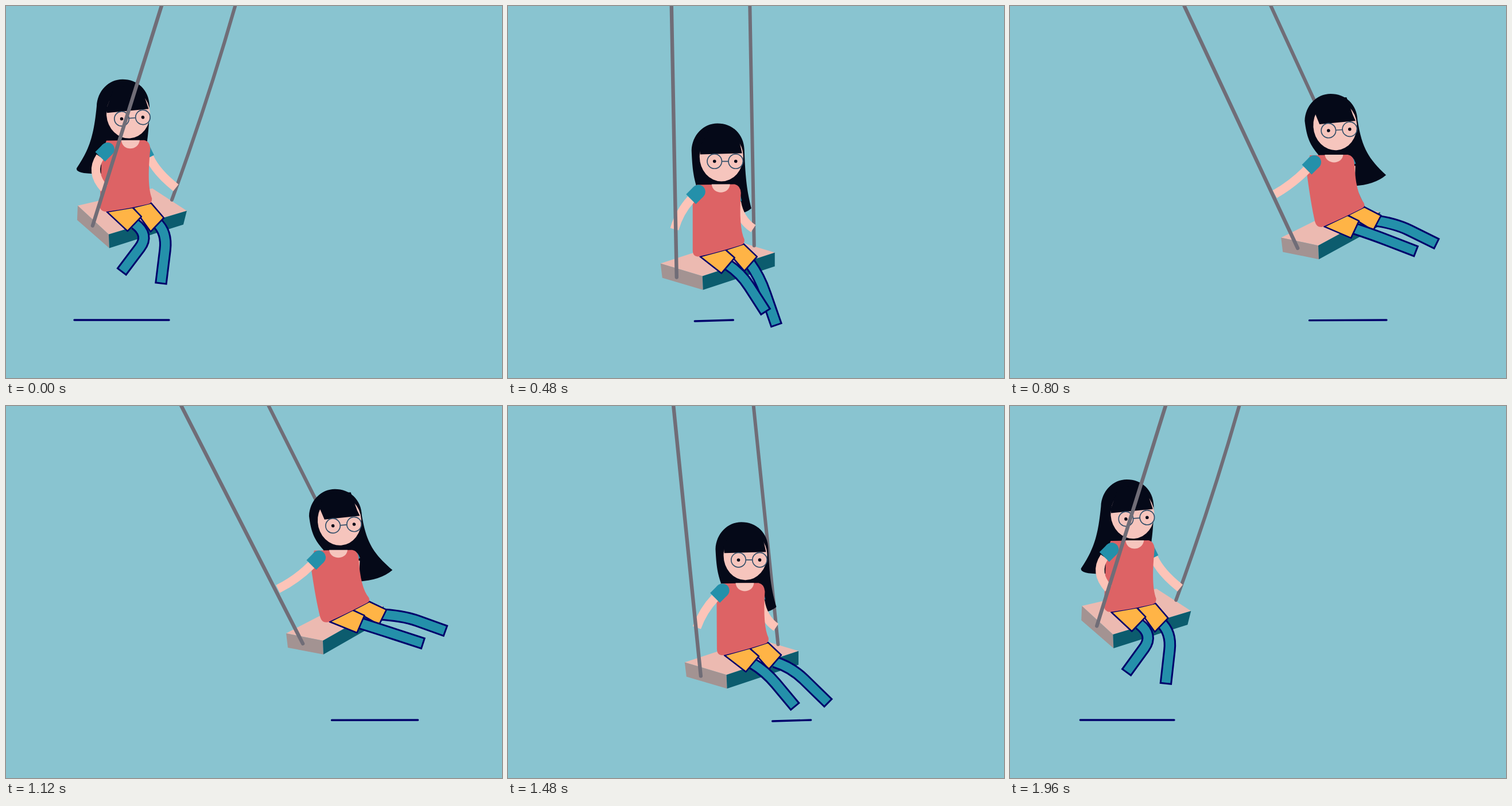
These frames come from a looping animation (864x648 px, 2 s). An HTML page:

```html
<!DOCTYPE html>
<html lang="en">
<head>
<meta charset="utf-8">
<title>Girl on a swing</title>
<style>
  html, body { margin: 0; width: 100%; height: 100%; overflow: hidden; background: #89c4d0; }
  svg { display: block; width: 100vw; height: 100vh; }
</style>
</head>
<body>
<svg id="stage" viewBox="0 0 864 648"></svg>
<script>
const LOOP = 2000, STEP = 40;
const NAVY = '#00006b', TEAL = '#2490aa', HAIR = '#050918', SKIN = '#fdc4b8',
      FACE = '#f6c5bd', YELLOW = '#ffb446', ROPE = '#706d77', FRAME = '#34506a';

// Clothes of the hanging pose, measured from the top of the head.
const SHIRT = 'M-36 107L30 106Q40 108 41 121Q37 181 47 202Q48 210 41 212Q-4 226 -33 232Q-43 232 -43 221Q-43 190 -43 131Z';
const NECK = 'M-10 106C-8 125 20 125 22 106Z';
const NEAR_SHORTS = 'M-30 232L7 261L30 234L14 220Z';
const FAR_SHORTS = 'M15 220L47 257L69 232L46 210Z';

const stage = document.getElementById('stage');

function set(el, attrs) {
  for (const name in attrs) el.setAttribute(name, attrs[name]);
}
function add(parent, tag, attrs = {}) {
  const el = document.createElementNS('http://www.w3.org/2000/svg', tag);
  set(el, attrs);
  parent.append(el);
  return el;
}
const filled = (parent, fill, extra) => add(parent, 'path', { fill, ...extra });
const stroked = (parent, stroke, width, cap = 'butt') =>
  add(parent, 'path', { fill: 'none', stroke, 'stroke-width': width, 'stroke-linecap': cap, 'stroke-linejoin': 'round' });

const shadow = stroked(stage, NAVY, 3.4, 'round');
const bench = add(stage, 'g');
const seatTop = filled(bench, '#ecbab1');
const seatSide = filled(bench, '#a39392');
const seatFront = filled(bench, '#0c5c6e');
const farRope = stroked(stage, ROPE, 6, 'round');
const girl = add(stage, 'g');
const hair = filled(girl, HAIR);

const makeArm = width => ({
  skin: stroked(girl, SKIN, 15),
  sleeve: stroked(girl, TEAL, width),
  cap: add(girl, 'circle', { r: width / 2, fill: TEAL })
});
const makeLeg = () => ({ edge: stroked(girl, NAVY, 21.5), fill: stroked(girl, TEAL, 15.5) });
const makeShorts = () => filled(girl, YELLOW, { stroke: NAVY, 'stroke-width': 2.6, 'stroke-linejoin': 'round' });

const farArm = makeArm(18);
const farLeg = makeLeg(), farShorts = makeShorts();
const nearLeg = makeLeg(), nearShorts = makeShorts();
const shirt = filled(girl, '#dd6365');
const neck = filled(girl, FACE);
const nearArm = makeArm(24);
const head = add(girl, 'g');
add(head, 'ellipse', { cx: 7, cy: 58, rx: 38, ry: 43, fill: FACE });
const fringe = filled(head, HAIR);
for (const cx of [-5, 32]) {
  add(head, 'circle', { cx, cy: 66, r: 12.7, fill: 'none', stroke: FRAME, 'stroke-width': 1.7 });
  add(head, 'circle', { cx, cy: 66, r: 2.8, fill: HAIR });
}
set(stroked(head, FRAME, 1.7), { d: 'M7.7 66H19.3' });
const nearRope = stroked(stage, ROPE, 6.4, 'round');

// Ease with horizontal handles at x = a and x = c.
function ease(x, a, c) {
  let lo = 0, hi = 1;
  for (let i = 0; i < 24; i++) {
    const s = (lo + hi) / 2, q = 1 - s;
    if (3 * a * s * q * q + 3 * c * s * s * q + s * s * s < x) lo = s; else hi = s;
  }
  return lo * lo * (3 - 2 * lo);
}

const plus = ([x, y], [dx, dy], k = 1) => [x + dx * k, y + dy * k];
const mix = (p, q, kx, ky) => [p[0] + (q[0] - p[0]) * kx, p[1] + (q[1] - p[1]) * ky];
const polygon = points => ({ d: 'M' + points.join(' ') + 'Z' });

function drawArm(arm, shoulder, cuff, elbow, hand) {
  set(arm.skin, { d: `M${cuff}Q${elbow} ${hand}` });
  set(arm.sleeve, { d: `M${shoulder}L${cuff}` });
  set(arm.cap, { cx: shoulder[0], cy: shoulder[1] });
}

function drawLeg(leg, hip, knee, degrees, length) {
  const a = degrees * Math.PI / 180, down = [Math.sin(a), Math.cos(a)];
  const shank = end => `M${hip}Q${knee} ${plus(knee, down, length * .35)}L${plus(knee, down, end)}`;
  set(leg.edge, { d: shank(length + 1.5) });
  set(leg.fill, { d: shank(length - 1.5) });
}

function drawHair(left, right, r) {
  const crownL = [-45, 47], crownR = [47, 46];
  const flow = (from, tip) => [mix(from, tip, .15, .5), mix(from, tip, .38, .7)];
  const [r1, r2] = flow(crownR, right), [l1, l2] = flow(crownL, left);
  const hem = right[1] + 9 + 11 * r;
  set(hair, { d: `M0 0C26 0 46 18 ${crownR}C${r1} ${r2} ${right}Q${right[0] - 8 - 13 * r} ${hem - 2} 40 ${hem}` +
    `L-15 ${left[1] + 8}Q${left[0] - 2} ${left[1] + 13} ${left}C${l2} ${l1} ${crownL}C-44 20 -24 0 0 0Z` });
}

function drawShadow(p, forward) {
  const e = ease(p, .5, .7), mid = 201.5 + 450 * (forward ? e : 1 - e);
  const spread = Math.sin(Math.PI / 2 * (p < .47 ? (.47 - p) / .47 : (p - .47) / .53)) ** 2;
  const half = (67 + 98 * spread) / 2;
  set(shadow, { d: `M${mid - half} ${549 - 2 * spread}L${mid + half} 547` });
}

function draw(time) {
  const t = Math.floor(time % LOOP / STEP) * STEP;
  const forward = t < LOOP / 2, p = t % (LOOP / 2) / (LOOP / 2);
  const u = forward ? ease(p, .59, .465) : 1 - ease(p, .59, .37);

  // How far the figure bends away from hanging, to the left and to the right.
  const l = Math.max(0, .43 - u) / .43, l2 = l * l, l3 = l2 * l;
  const r = Math.max(0, u - .5) / .48;
  const tuck = (1 - u) ** 15;
  const bend = (rest, toLeft, toRight, k = l) => plus(plus(rest, toLeft, k), toRight, r);

  const angle = (17.4 - 45.2 * u) * Math.PI / 180, length = 515 - 70 * l ** 1.75 - 3 * r;
  const end = plus([284, -42], [-Math.sin(angle), Math.cos(angle)], length);
  const top = plus(end, [71 - 19 * l2 - 15 * r, -268 + 13 * l3 - r]);
  const move = { transform: `translate(${top})` };
  set(bench, move);
  set(girl, move);

  set(nearRope, { d: `M284 -42L${end}` });
  const farEnd = plus(top, bend([64, 213], [22, -3], [-1, -3], l2));
  const sag = plus(mix([420, -75], farEnd, .5, .5), [10 * l2, 0]);
  set(farRope, { d: `M420 -75Q${sag} ${farEnd}` });

  const left = bend([-99, 244], [21, -24], [14, 7], l3);
  const back = bend([27, 203], [25, -13], [-5, -7], l3);
  const right = bend([100, 225], [12, 4], [-15, -21], l3);
  const front = bend([-26, 266], [2, 4], [5, -2], l3);
  const under = corner => plus(corner, [1, 24]);
  set(seatTop, polygon([left, back, right, front]));
  set(seatSide, polygon([left, front, under(front), plus(left, [3 - 4 * l3, 25])]));
  set(seatFront, polygon([front, right, plus(right, [-6 * l3, 24]), under(front)]));

  // Clothes lean with the swing, more the lower they are.
  const lean = path => ({ d: path.replace(/(-?\d+) (-?\d+)/g, (_, a, b) => {
    const x = +a, drop = b - 106, w = drop / 120;
    return [x + .0013 * r * drop * drop + l2 * (8 - .04 * drop),
            +b + w * ((.1 * l2 - .2 * r) * x + 2 * l2 - 7 * r)].join(' ');
  }) });
  set(shirt, lean(SHIRT));
  set(neck, lean(NECK));
  set(nearShorts, lean(NEAR_SHORTS));
  set(farShorts, lean(FAR_SHORTS));

  drawHair([-36 - 44 * l2 + 16 * r, 106 + 49 * Math.min(1, 2 * l)],
           [60 - 17 * l + 40 * r, 148 - 40 * l2 - 7 * r], r);
  set(head, { transform: `translate(${3 * l2 + r} ${2 * l2 - 3 * r}) rotate(${-4 * (l2 + r)} 7 58)` });
  set(fringe, { d: `M${-31 + 4 * r} ${42 - 11 * r + 6 * l}L${-30 + 11 * r} 54L43 52` +
    `L${39 - 2 * l2} ${34 + 8 * r - 5 * l2}L30 10L-14 10Z` });

  const shoulder = bend([-33, 119], [7, 3], [5, 0], l2);
  drawArm(nearArm, shoulder, plus(shoulder, [-13, 13]),
    bend([-67, 154], [10, 8], [0, 4]), bend([-77, 184], [45, 6], [-22, -10]));
  drawArm(farArm, bend([29, 118], [8, -2], [4, 0]), bend([33, 137], [14, -1], [3, -13]),
    bend([38, 168], [21, -6], [-5, -8]), bend([61, 183], [32, 6], [-21, 7]));

  // The far leg trails behind on the way forward.
  const lag = forward ? Math.sin(Math.PI * u) : 0;
  drawLeg(nearLeg, bend([18, 246], [4, 6], [21, -14], l2),
    plus(bend([41, 260], [-10, 11], [36, -16]), [16, 0], tuck), 5 + 68 * u - 42 * tuck, 80);
  drawLeg(farLeg, bend([57, 244], [2, 5], [18, -26], l2),
    plus(bend([86, 253], [-8, 13], [31, -33]), [-13, 13], lag), 19 + 52 * u - 26 * tuck - 22 * lag, 90 - 10 * r);

  drawShadow(p, forward);
}

const start = performance.now();
function tick() {
  draw(performance.now() - start);
  requestAnimationFrame(tick);
}
tick();
</script>
</body>
</html>
```
